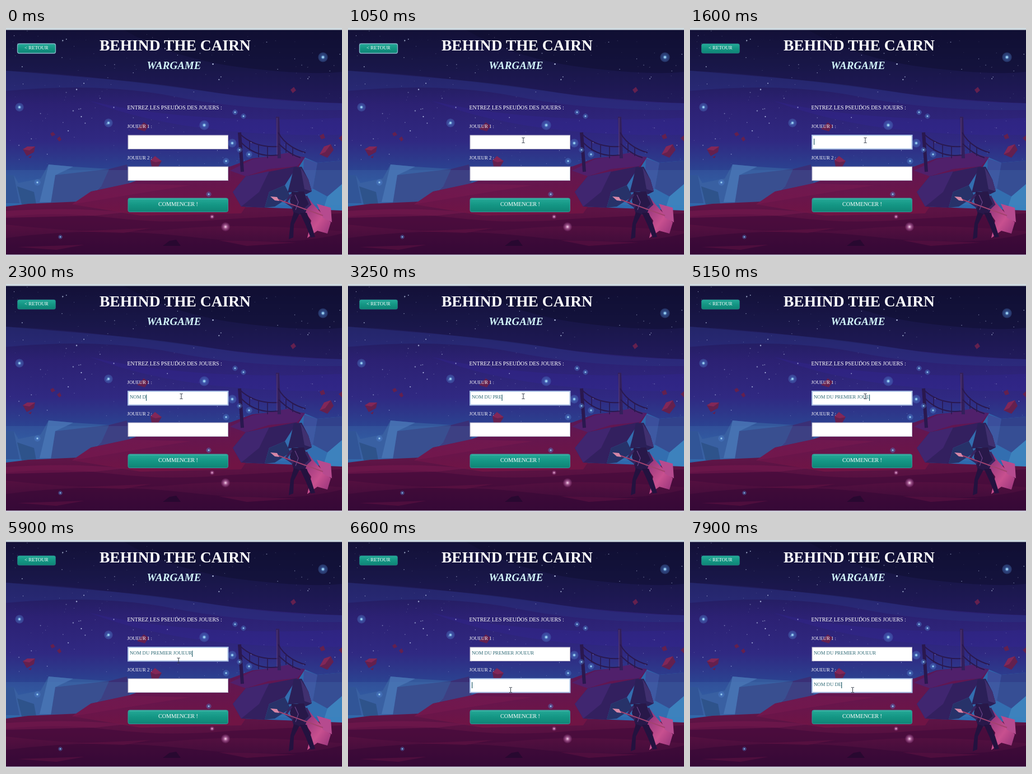
These frames come from a looping animation (600x406 px, 8000 ms). An HTML page:

```html
<!DOCTYPE html>
<html lang="fr">
<head>
<meta charset="utf-8">
<title>Wargame</title>
<style>
html, body { margin: 0; width: 100%; height: 100%; overflow: hidden; background: #10102f; }
svg { display: block; width: 600px; height: 406px; }
text { font-family: "Liberation Serif", serif; fill: #fff; white-space: pre; }
.typed { font-size: 8.75px; fill: #2a6672; }
.label { font-size: 8.7px; }
</style>
</head>
<body>
<svg viewBox="0 0 600 406">
  <defs>
    <linearGradient id="sky" x1="0" y1="0" x2="0" y2="1">
      <stop offset="0" stop-color="#121033"/>
      <stop offset=".2" stop-color="#1c1a50"/>
      <stop offset=".42" stop-color="#2c2173"/>
      <stop offset=".62" stop-color="#302982"/>
      <stop offset=".78" stop-color="#2b4391"/>
      <stop offset="1" stop-color="#2c68ab"/>
    </linearGradient>
    <linearGradient id="ground" x1="0" y1="0" x2="0" y2="1">
      <stop offset="0" stop-color="#601547"/>
      <stop offset=".4" stop-color="#561040"/>
      <stop offset="1" stop-color="#360a38"/>
    </linearGradient>
    <linearGradient id="slope" x1="0" y1="0" x2=".25" y2="1">
      <stop offset="0" stop-color="#4d1a60"/>
      <stop offset=".5" stop-color="#64164f"/>
      <stop offset="1" stop-color="#701444"/>
    </linearGradient>
    <linearGradient id="cape" x1="0" y1="0" x2="1" y2="1">
      <stop offset="0" stop-color="#7d2a72"/>
      <stop offset=".6" stop-color="#c8508f"/>
      <stop offset="1" stop-color="#8f2f78"/>
    </linearGradient>
    <linearGradient id="teal" x1="0" y1="0" x2="0" y2="1">
      <stop offset="0" stop-color="#25aa98"/>
      <stop offset=".5" stop-color="#149684"/>
      <stop offset="1" stop-color="#0f8475"/>
    </linearGradient>
    <radialGradient id="glow">
      <stop offset="0" stop-color="#d5f2ff"/>
      <stop offset=".22" stop-color="#79b9ea" stop-opacity=".9"/>
      <stop offset=".4" stop-color="#4f80cc" stop-opacity=".5"/>
      <stop offset=".9" stop-color="#4f80cc" stop-opacity=".32"/>
      <stop offset="1" stop-color="#4f80cc" stop-opacity="0"/>
    </radialGradient>
    <radialGradient id="rose">
      <stop offset="0" stop-color="#ffe0f4"/>
      <stop offset=".4" stop-color="#c77bb4" stop-opacity=".7"/>
      <stop offset="1" stop-color="#a14b92" stop-opacity=".15"/>
    </radialGradient>
  </defs>

  <!-- sky -->
  <rect width="600" height="325" fill="url(#sky)"/>
  <path d="M0 3H600V134Q470 128 380 116T190 92T0 76Z" fill="#14123c" opacity=".42"/>
  <path d="M210 3Q300 55 420 70T600 78V3Z" fill="#0c0e2c" opacity=".42"/>
  <path d="M0 76Q100 84 190 92T380 116T600 134V146Q430 148 300 122T0 112Z" fill="#2b3384" opacity=".45"/>
  <path d="M150 130Q330 172 600 160V190Q320 196 150 130Z" fill="#35279a" opacity=".28"/>
  <g id="stars"></g>

  <!-- distant crystals -->
  <path d="M0 262L14 262L22 276L62 268L76 243L120 247L184 251L216 245L222 312H0Z" fill="#34589c"/>
  <path d="M76 243L60 310H92L88 262L120 247Z" fill="#456eb0"/>
  <path d="M88 262L184 251L170 282L132 312H80Z" fill="#344286"/>
  <path d="M184 251L216 243L222 286L150 300L170 282Z" fill="#3a2f76"/>
  <path d="M20 282L28 314H54L50 292Z" fill="#27477f"/>
  <path d="M0 262L14 262L24 312H0Z" fill="#2b4a8e"/>
  <path d="M470 262L532 230L556 240L600 236V325H440Z" fill="#2d69ae"/>
  <path d="M532 232L556 240L548 286L528 302Z" fill="#3b4f9c"/>
  <path d="M556 240L600 236V278L574 300L548 286Z" fill="#31418b"/>
  <path d="M574 300L600 278V325H566Z" fill="#3a82be"/>
  <rect y="253" width="600" height="62" fill="#4a82b8" opacity=".2"/>

  <!-- ground and ruined platform -->
  <path d="M0 318L40 313L130 309L420 318L600 325V404H0Z" fill="url(#ground)"/>
  <path d="M118 314L152 291L218 277L262 262L338 262L402 246L440 232L500 226L534 230L520 252L486 262L440 300L420 330L240 334Z" fill="url(#slope)"/>
  <path d="M400 254L440 234L504 222L533 231L520 246L470 251L428 264Z" fill="#50206b"/>
  <path d="M428 264L520 246L498 280L470 292L462 320L420 318L405 292Z" fill="#33205f"/>
  <path d="M428 264L470 255L452 292L420 318L405 292Z" fill="#402670"/>
  <path d="M470 292L498 280L508 300L480 318L462 320Z" fill="#273269"/>
  <path d="M150 292L218 277L330 280L240 294L118 314Z" fill="#7b1b51" opacity=".5"/>
  <path d="M0 336Q90 326 190 338T400 340L600 330V362Q420 346 300 358T0 350Z" fill="#430b3a" opacity=".62"/>
  <path d="M0 326Q110 318 214 328L160 334L0 338Z" fill="#7a1b50" opacity=".5"/>
  <path d="M0 374Q160 352 330 372T600 366V404H0Z" fill="#350936" opacity=".55"/>
  <path d="M280 388L292 379L304 377L312 388Z" fill="#280830"/>
  <path d="M130 362L260 356L210 365ZM380 378L520 382L430 388ZM20 390L140 386L90 395Z" fill="#691446" opacity=".45"/>

  <!-- bridge posts and ropes -->
  <g fill="none" stroke="#2a184f" stroke-width="2">
    <path d="M417 186L422 256" stroke-width="6"/>
    <path d="M485 158L488 232" stroke-width="6" stroke="#33205c"/>
    <path d="M417 188Q444 214 486 211M420 204Q448 232 486 226M486 186Q500 212 535 222M487 206Q506 225 526 231"/>
    <path d="M435 202V218M451 209V230M467 211V232M500 205V222M512 213V228" stroke-width="1.5"/>
    <path d="M484 160V226" stroke="#614084" stroke-width="1"/>
  </g>

  <!-- floating rocks -->
  <g fill="#64204e">
    <path d="M30 216L38 211L52 211L50 221L37 228Z"/>
    <path d="M79 188L84 185L88 190L82 193ZM91 197L96 193L99 199L95 202ZM40 230L46 227L44 232Z"/>
    <path d="M234 180L246 168L255 174L248 184ZM258 236L266 228L278 237L272 247L260 247Z"/>
    <path d="M508 110L514 105L518 111L512 116ZM560 192L567 188L570 196L563 198ZM594 196L600 191V202Z"/>
    <path d="M560 225L568 211L580 207L585 217L574 231Z"/>
  </g>
  <g fill="#8c2a5b" opacity=".75">
    <path d="M30 216L38 211L52 211L42 218ZM560 225L568 211L580 207L570 221ZM258 236L266 228L278 237L267 239Z"/>
  </g>

  <!-- hooded warrior -->
  <path d="M540 302Q552 320 580 346L574 366L556 361L538 374L545 343L526 316Z" fill="url(#cape)"/>
  <path d="M555 313L580 320L582 346L566 338Z" fill="#b64b8f"/>
  <path d="M514 248L528 247L540 270L546 291L536 296L520 291L503 293L509 270Z" fill="#2b2058"/>
  <path d="M526 248L540 270L546 291L533 287Z" fill="#40306f"/>
  <path d="M510 292L532 291L541 313L533 333L514 331L507 308Z" fill="#281849"/>
  <path d="M514 328L524 331L514 350L513 373L505 376L508 348ZM525 329L537 329L545 350L552 372L544 373L536 353Z" fill="#23123f"/>
  <path d="M510 296L500 310L513 319M536 299L543 314L532 324" fill="none" stroke="#382560" stroke-width="4"/>
  <path d="M482 304L566 334" stroke="#a34370" stroke-width="2"/>
  <path d="M472 300L484 301L488 308L480 307Z" fill="#d787a7"/>
  <path d="M516 297L522 310L517 324" fill="none" stroke="#6a4588" stroke-width="1.2"/>
  <g id="motes"></g>

  <rect width="600" height="3.5" fill="#cfdae0"/>
  <rect y="403.5" width="600" height="2.5" fill="#d0d1dc"/>

  <!-- form -->
  <text x="302" y="40" font-size="27.5" font-weight="bold" text-anchor="middle">BEHIND THE CAIRN</text>
  <text x="300" y="73" font-size="19" font-weight="bold" font-style="italic" text-anchor="middle" style="fill:#d3f6fb">WARGAME</text>
  <rect id="back" x="20.5" y="28" width="68" height="17" rx="3" fill="url(#teal)"/>
  <text x="33" y="38" font-size="8.9">&lt; RETOUR</text>
  <text x="216.500" y="144.500" font-size="9.9">ENTREZ LES PSEUDOS DES JOUERS :</text>
  <text class="label" x="216.500" y="178">JOUEUR 1 :</text>
  <text class="label" x="216.500" y="234">JOUEUR 2 :</text>
  <g id="fields"></g>
  <rect x="218" y="303" width="178.500" height="24.500" rx="3" fill="url(#teal)" stroke="#3f8f98"/>
  <path d="M221 304.500H394" stroke="#5cc4b5" opacity=".6"/>
  <text x="307.500" y="317" font-size="10.1" text-anchor="middle">COMMENCER !</text>
  <rect id="caret" width="1.2" height="11" fill="#28616d"/>
  <g id="pointer">
    <path id="beam" d="M-2.500 -4.500H-.8L0 -4L.8 -4.500H2.500M0 -4V4M-2.500 4.500H-.8L0 4L.8 4.500H2.500" fill="none" stroke="#333a48"/>
    <path id="arrow" d="M0 0V12L3 9.500L5 14L7 13L5 9H9Z" fill="#fff" stroke="#222" stroke-width=".7"/>
  </g>
</svg>
<script>
const LOOP = 8000;
const $ = id => document.getElementById(id);

function add(parent, tag, attrs) {
  const el = document.createElementNS("http://www.w3.org/2000/svg", tag);
  for (const key in attrs) el.setAttribute(key, attrs[key]);
  return parent.appendChild(el);
}

let seed = 41;
const random = () => (seed = seed * 16807 % 2147483647) / 2147483647;
for (let i = 0; i < 30; i++) random();

for (let i = 0; i < 190; i++) {
  add($("stars"), "circle", {
    cx: random() * 600, cy: 5 + random() * 240,
    r: 0.35 + random() ** 4 * 0.9, fill: "#d4e2ff", opacity: 0.3 + random() * 0.65
  });
}

const motes = [
  [24, 141, 8], [183, 169, 8], [354, 173, 9], [404, 205, 8], [409, 150, 5],
  [424, 157, 5], [566, 52, 9], [393, 237, 6], [434, 225, 6], [417, 217, 5],
  [56, 275, 6], [362, 296, 5], [97, 372, 4]
];
for (const [cx, cy, r] of motes) add($("motes"), "circle", { cx, cy, r, fill: "url(#glow)" });
add($("motes"), "circle", { cx: 392, cy: 354, r: 8, fill: "url(#rose)" });
add($("motes"), "circle", { cx: 368, cy: 336, r: 4, fill: "url(#rose)" });

function makeField(y, value, keys, focusFrom, focusTo) {
  const box = add($("fields"), "rect", { x: 218, y, width: 178.5, height: 24.5, fill: "#fff" });
  const text = add($("fields"), "text", { x: 221, y: y + 13, class: "typed" });
  return { y, value, keys, focusFrom, focusTo, box, text };
}

// keys: [time, characters typed]
const fields = [
  makeField(191, "NOM DU PREMIER JOUEUR",
    [[1450, 0], [2290, 5], [4190, 15], [5140, 19], [5600, 21]], 1350, 6350),
  makeField(247, "NOM DU DEUXIEME JOUEUR",
    [[6700, 0], [7890, 9], [8100, 10]], 6350, LOOP)
];

function interpolate(points, t, ease = u => u) {
  if (t <= points[0][0]) return points[0][1];
  for (let i = 1; i < points.length; i++) {
    const [t0, a] = points[i - 1], [t1, b] = points[i];
    if (t < t1) return a + (b - a) * ease((t - t0) / (t1 - t0));
  }
  return points[points.length - 1][1];
}

const smooth = u => u * u * (3 - 2 * u);
const pathX = [[100, 2], [850, 313], [5750, 313], [6250, 290.5]];
const pathY = [[100, 22], [850, 200], [5750, 200], [6250, 267]];

function drawField(field, t) {
  const focused = t >= field.focusFrom && t < field.focusTo;
  const count = Math.floor(interpolate(field.keys, t) + 1e-6);
  field.text.textContent = field.value.slice(0, count);
  field.box.setAttribute("stroke", focused ? "#a6bce2" : "#b3aec6");
  field.box.setAttribute("stroke-width", focused ? 2 : 1);
  if (focused) {
    const width = count ? field.text.getComputedTextLength() : 0;
    $("caret").setAttribute("x", 221 + width);
    $("caret").setAttribute("y", field.y + 6);
  }
  return focused;
}

function render(t) {
  const focused = fields.map(field => drawField(field, t)).some(Boolean);
  $("caret").style.display = focused ? "" : "none";
  $("back").setAttribute("stroke", focused ? "#2b7d88" : "#83b5c6");
  $("back").setAttribute("stroke-width", focused ? 0.6 : 1.3);

  const x = interpolate(pathX, t, smooth), y = interpolate(pathY, t, smooth);
  const inField = x > 218 && x < 397 && fields.some(f => y > f.y && y < f.y + 25);
  $("pointer").style.display = t < 100 ? "none" : "";
  $("pointer").setAttribute("transform", `translate(${x} ${y})`);
  $("beam").style.display = inField ? "" : "none";
  $("arrow").style.display = inField ? "none" : "";
}

const start = performance.now();
function frame() {
  render((performance.now() - start) % LOOP);
  requestAnimationFrame(frame);
}
frame();
</script>
</body>
</html>
```
